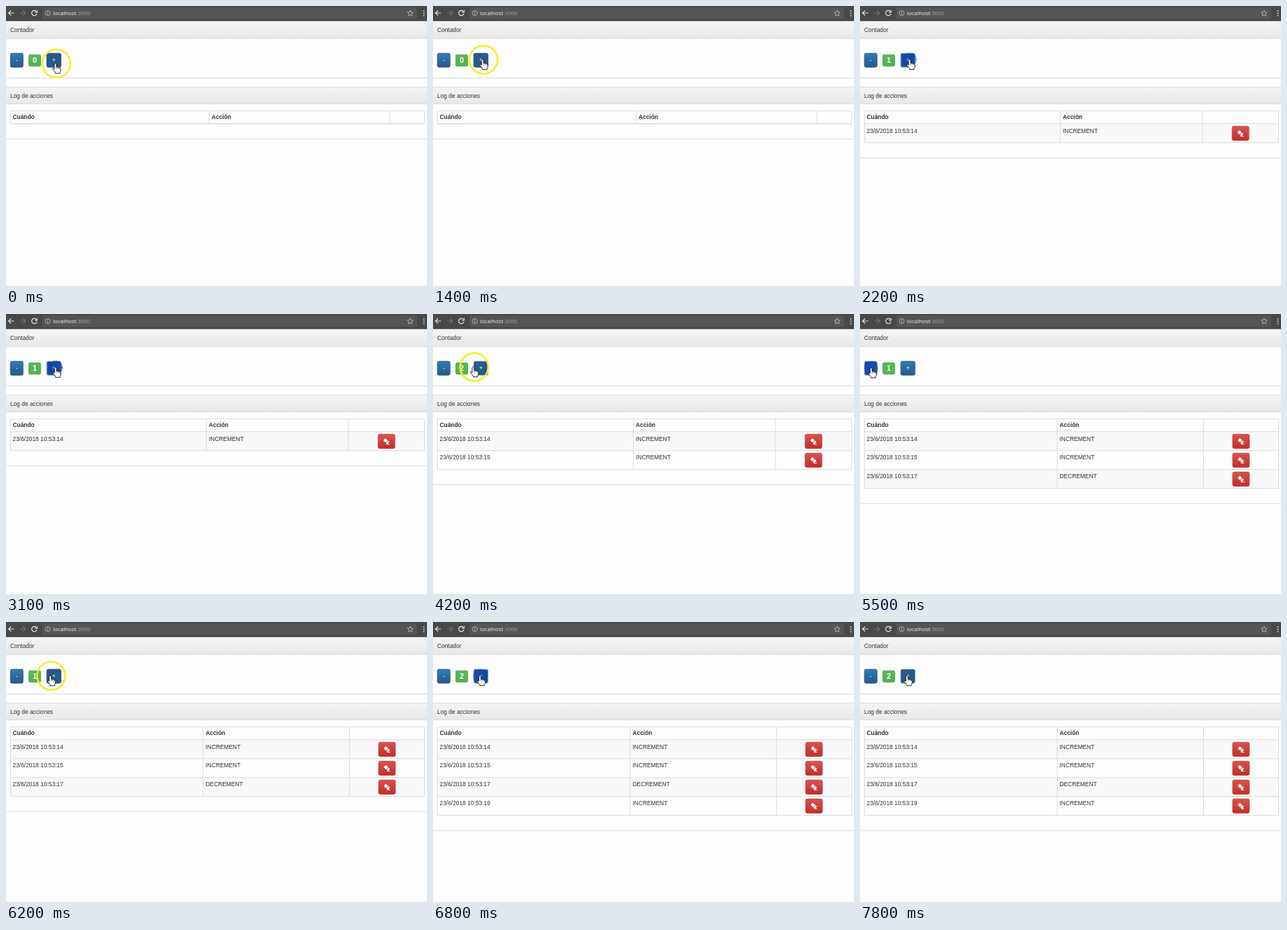
These frames come from a looping animation (600x399 px, 8000 ms). An HTML page:

```html
<!DOCTYPE html>
<html lang="es">
<head>
<meta charset="utf-8">
<title>Contador</title>
<style>
  html, body { margin: 0; width: 100%; height: 100%; overflow: hidden; background: #fdfdfe; }
  svg { display: block; width: 600px; height: 399px; }
  text { font: 8.4px "Liberation Sans", Arial, sans-serif; fill: #333; }
  .bold { font-weight: bold; }
  .white { fill: #fff; text-anchor: middle; }
  .count { font-size: 10.8px; font-weight: bold; }
  .url { font: 7.9px "Open Sans", sans-serif; fill: #f2f2f2; }
  .line { stroke: #ddd; stroke-width: 1; fill: none; }
  .icon { stroke: #e4e4e4; stroke-width: 1.2; fill: none; }
  .button { fill: url(#blue); stroke: #245580; stroke-width: .7; }
  .button.hover { fill: #265a88; }
  .button.focus { stroke: #7fa9d6; }
  .button.pressed { fill: #174f9f; stroke: #8db9ea; stroke-width: 1; }
</style>
</head>
<body>
<svg viewBox="0 0 600 399">
  <defs>
    <linearGradient id="blue" x2="0" y2="1"><stop stop-color="#337ab7"/><stop offset="1" stop-color="#265a88"/></linearGradient>
    <linearGradient id="red" x2="0" y2="1"><stop stop-color="#d9534f"/><stop offset="1" stop-color="#c12e2a"/></linearGradient>
    <linearGradient id="green" x2="0" y2="1"><stop stop-color="#5cb85c"/><stop offset="1" stop-color="#52b152"/></linearGradient>
    <linearGradient id="heading" x2="0" y2="1"><stop stop-color="#f5f5f5"/><stop offset="1" stop-color="#e8e8e8"/></linearGradient>
    <g id="erase">
      <rect x="-12" y="-10.2" width="24" height="20.4" rx="2.4" fill="url(#red)" stroke="#b92c28" stroke-width=".6"/>
      <g transform="rotate(42)" fill="#fff">
        <rect x="-4.4" y="-2.3" width="4.6" height="4.4" rx=".6"/>
        <path d="M.9-2.3H3.6V2.1H.9z"/>
      </g>
      <path d="M0 4H4.6" stroke="#fff"/>
    </g>
  </defs>

  <rect width="600" height="21" fill="#4a4949"/>
  <rect x="52" y="2" width="534" height="16.5" rx="1.5" fill="#565555"/>
  <path d="M0 21H600" stroke="#3c3b3b"/>
  <g class="icon">
    <path d="M11.5 10H3.8M7.3 6.3L3.6 10L7.3 13.7"/>
    <path d="M20 10H27.7M24.2 6.3L27.9 10L24.2 13.7" stroke="#747373"/>
    <path d="M43 7.4A3.7 3.7 0 1 0 44 10.8M44.3 5.7V8.8H41.2"/>
    <circle cx="59.5" cy="10.2" r="3.5" stroke="#c4c4c4" stroke-width=".8"/>
    <path d="M59.5 9.6V12.3M59.5 7.9V8.8" stroke="#c4c4c4" stroke-width=".9"/>
    <path d="M576 6L577.2 8.8L580.2 9L577.9 11L578.6 14L576 12.4L573.4 14L574.1 11L571.8 9L574.8 8.8Z" stroke="#c4c4c4" stroke-width=".8"/>
    <path d="M595.5 6.2V14.6" stroke-width="1.6" stroke-dasharray="1.6 1.8"/>
  </g>
  <text class="url" x="67" y="13">localhost<tspan fill="#a3a2a2">:3000</tspan></text>

  <rect y="22" width="600" height="24" fill="url(#heading)"/>
  <path class="line" d="M0 46.5H600M0 102.5H600"/>
  <text x="6" y="37">Contador</text>
  <rect id="minus" class="button" x="6.2" y="67.3" width="18.2" height="20" rx="2.4"/>
  <text class="white" x="15.3" y="80">-</text>
  <rect x="32" y="69" width="18" height="17.2" rx="2.4" fill="url(#green)"/>
  <text id="count" class="white count" x="41" y="81.3">0</text>
  <rect id="plus" class="button" x="58" y="67.3" width="20.5" height="20" rx="2.4"/>
  <text class="white" x="68.2" y="80">+</text>

  <rect y="115" width="600" height="24.5" fill="url(#heading)"/>
  <path class="line" d="M0 115.5H600M0 139.5H600"/>
  <text x="6" y="130.5">Log de acciones</text>
  <g id="rows"></g>
  <path id="grid" class="line"/>
  <path class="line" d="M6 167.7H596.5"/>
  <text class="bold" x="9.5" y="161.3">Cuándo</text>
  <text id="action" class="bold" y="161.3">Acción</text>

  <g id="pointer">
    <circle id="ring" cx="1.2" r="20" fill="none" stroke="#f4ef2a" stroke-width="2.6"/>
    <circle id="click" r="9" fill="#1238c4" fill-opacity=".35" stroke="#0c2fb4" stroke-width="1.8" stroke-dasharray="2 1"/>
    <path d="M-1.6 1Q-1.6-.5-.2-.5T1.2 1V5Q2.3 4.2 3.3 5.3Q4.5 4.7 5.3 5.9Q7.3 5.6 7.3 7.6V9.6Q7.2 11.3 6.2 12.4V14H-.3V12.6Q-1.9 10.8-3.9 7.9Q-4.4 6.6-3.2 6.5Q-2.4 6.6-1.6 7.8Z" fill="#fff" stroke="#151515" stroke-width=".9" stroke-linejoin="round"/>
    <path d="M1.2 5V8M3.3 5.6V8M5.3 6.2V8" stroke="#333" stroke-width=".5"/>
  </g>
</svg>
<script>
const LOOP = 8000, ROW_TOP = 168, ROW_HEIGHT = 26.9;
const log = [
  { at: 2000, second: 14, action: 'INCREMENT' },
  { at: 3200, second: 15, action: 'INCREMENT' },
  { at: 5300, second: 17, action: 'DECREMENT' },
  { at: 6600, second: 19, action: 'INCREMENT' }
];
const counts = [0, 1, 2, 1, 2];
const columns = [[289.5, 547], [285.5, 488], [285.5, 488], [281, 489.5], [281, 489.5]];
// time, x, y of the fingertip
const path = [[0, 70.6, 82], [100, 70.6, 82], [900, 70.8, 76.6], [3850, 70.8, 76.3],
  [4200, 57.5, 75.6], [4700, 16, 77], [5700, 16, 77], [6300, 67, 76.8], [LOOP, 67, 76.8]];
const ringTimes = [[0, 1900], [3900, 5200], [5750, 6500]];
const pressTimes = [[1900, 2300], [3000, 3400], [5200, 5600], [6500, 6900]];

const $ = id => document.getElementById(id);
const within = (ranges, t) => ranges.find(([from, to]) => t >= from && t < to);
const setShown = (el, shown) => el.setAttribute('visibility', shown ? 'visible' : 'hidden');

function pointerAt(t) {
  const i = path.findIndex(p => p[0] > t);
  const [t0, x0, y0] = path[i - 1], [t1, x1, y1] = path[i];
  const u = (t - t0) / (t1 - t0), k = u * u * (3 - 2 * u);
  return [x0 + (x1 - x0) * k, y0 + (y1 - y0) * k];
}

function drawTable(n) {
  const [a, b] = columns[n], bottom = ROW_TOP + n * ROW_HEIGHT;
  let lines = `M6.5 149.5H596.5V${bottom}H6.5ZM${a} 149.5V${bottom}M${b} 149.5V${bottom}`;
  lines += `M0 ${bottom + 21.5}H600`;
  $('rows').innerHTML = log.slice(0, n).map((entry, i) => {
    const y = ROW_TOP + i * ROW_HEIGHT;
    if (i) lines += `M6 ${y}H596.5`;
    return `<rect x="6.5" y="${y}" width="590" height="${ROW_HEIGHT}" fill="${i % 2 ? '#fdfdfe' : '#f8f8f9'}"/>
      <text x="9.5" y="${y + 12.5}">23/6/2018 10:53:${entry.second}</text>
      <text x="${a + 3.5}" y="${y + 12.5}">${entry.action}</text>
      <use href="#erase" x="${(b + 596.5) / 2}" y="${y + 13.5}"/>`;
  }).join('');
  $('grid').setAttribute('d', lines);
  $('action').setAttribute('x', a + 3.5);
  $('count').textContent = counts[n];
}

function styleButton(id, over, focused, pressed) {
  $(id).setAttribute('class', 'button' + (over ? ' hover' : '') +
    (focused ? ' focus' : '') + (over && pressed ? ' pressed' : ''));
}

let start, drawn = -1;
function frame(now) {
  start ??= now;
  const t = Math.max(0, now - start) % LOOP;
  const n = log.filter(entry => entry.at <= t).length;
  if (n !== drawn) drawTable(drawn = n);

  const [x, y] = pointerAt(t), press = within(pressTimes, t);
  $('pointer').setAttribute('transform', `translate(${x} ${y})`);
  setShown($('ring'), within(ringTimes, t));
  setShown($('click'), press);
  if (press) $('click').setAttribute('opacity', 1 - .5 * (t - press[0]) / (press[1] - press[0]));
  styleButton('minus', x < 24.5, n === 3 && x < 24.5, press);
  styleButton('plus', x > 57, n && n !== 3, press);
  requestAnimationFrame(frame);
}
requestAnimationFrame(frame);
</script>
</body>
</html>
```
